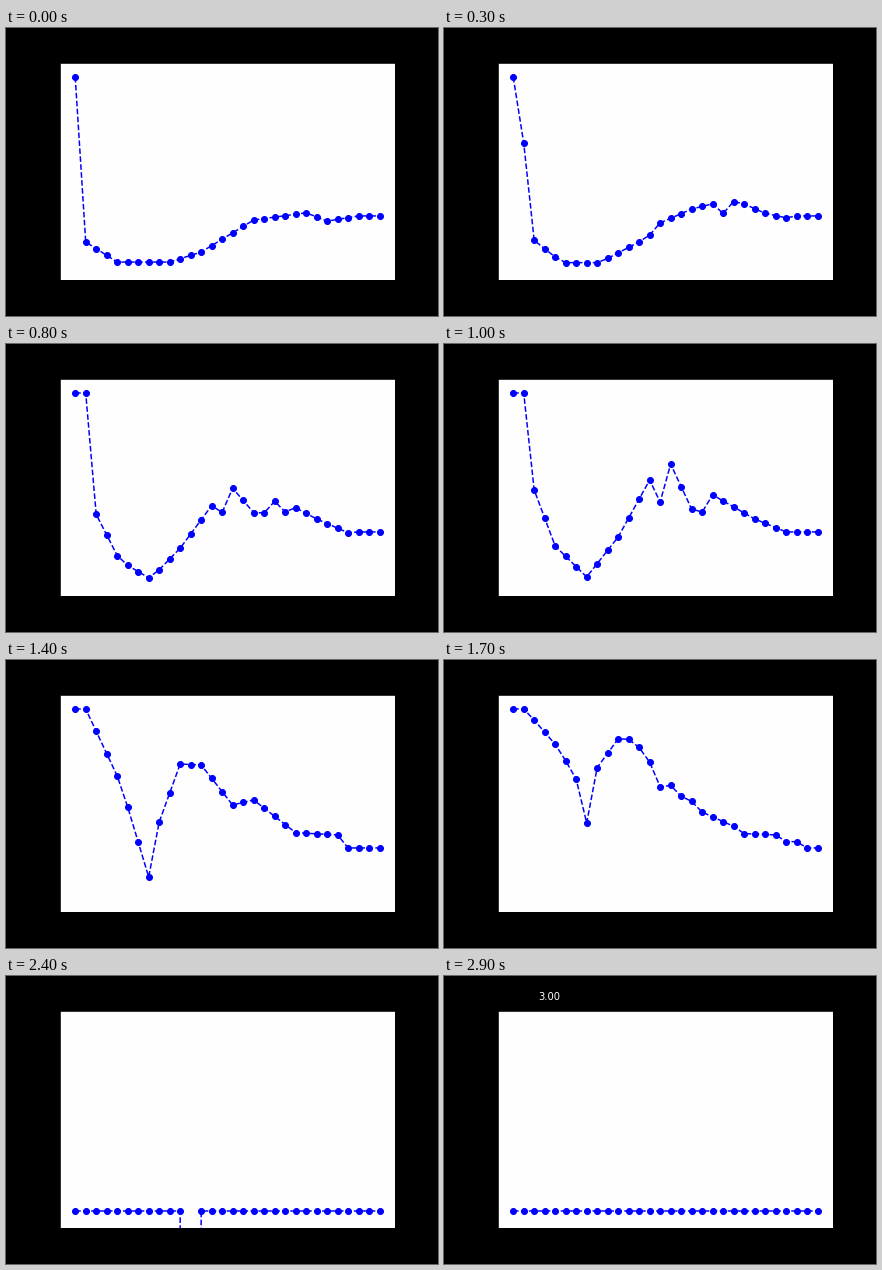
A matplotlib script that plays this animation: 432 px wide and 288 px high, repeating every 3000 ms.

```python
import numpy as np
import matplotlib.pyplot as plt
from matplotlib.animation import FuncAnimation

W, H, DPI = 432, 288, 72
FRAMES, INTERVAL = 30, 100
COUNT = 30
COLLAPSE = 23           # step at which the curve drops to zero
OFF_SCALE = -1000
TAIL = 0.253            # level the right end settles at

x = np.arange(COUNT)


def shape(*corners):
    """Polyline through (index, level) corners, flat beyond both ends."""
    return np.interp(x, *zip(*corners))


# The curve melts from each shape into the next.
SHAPES = {
    0: shape((0, 1), (1, 0.113), (4, 0.005), (9, 0.005), (12, 0.059),
             (17, 0.231), (22, 0.27), (24, 0.225), (27, TAIL)),
    5: shape((1, 1), (2, 0.151), (5, 0), (8, 0), (13, 0.188), (14, 0.274),
             (19, 0.366), (20, 0.274), (21, 0.376), (26, 0.242), (27, TAIL)),
    10: shape((1, 1), (2, 0.478), (4, 0.177), (7, 0.011), (10, 0.226),
              (13, 0.532), (14, 0.414), (15, 0.618), (17, 0.376),
              (18, 0.36), (19, 0.452), (23, 0.323), (26, TAIL)),
    14: shape((1, 1), (4, 0.64), (5, 0.473), (7, 0.097), (8, 0.392),
              (10, 0.704), (12, 0.699), (15, 0.484), (17, 0.511),
              (21, 0.335), (25, 0.323), (26, TAIL)),
    20: shape((2, 1), (6, 0.96), (7, 0.677), (8, 0.978), (11, 0.973),
              (13, 0.801), (14, 0.608), (15, 0.694), (16, 0.565),
              (18, 0.425), (21, 0.403), (22, 0.328), (27, 0.32), (28, TAIL)),
}


def levels(n):
    """Levels of all points at step n."""
    if n >= COLLAPSE:
        y = np.zeros(COUNT)
        spike = 11 + 5 * (n - 24)   # one stray point walks to the right
        if spike < COUNT:
            y[spike] = OFF_SCALE
        return y
    times = list(SHAPES)
    i = min(np.searchsorted(times, n, side="right"), len(times) - 1)
    t0, t1 = times[i - 1], times[i]
    t = (n - t0) / (t1 - t0)
    return np.clip((1 - t) * SHAPES[t0] + t * SHAPES[t1], 0, 1)


fig = plt.figure(figsize=(W / DPI, H / DPI), dpi=DPI, facecolor="black")
ax = fig.add_axes([0.125, 0.125, 0.775, 0.755], facecolor="#fefefe")
ax.set_xticks([])
ax.set_yticks([])
margin = 0.05 * (COUNT - 1)
ax.set_xlim(-margin, COUNT - 1 + margin)
ax.set_ylim(-0.0914, 1.0776)

line, = ax.plot(x, levels(0), "--o", color="#0000ff", lw=1.5, ms=6)
label = fig.text(94 / W, 1 - 24 / H, "3.00", color="white", fontsize=10,
                 family="DejaVu Sans", visible=False)


def update(n):
    line.set_ydata(levels(n))
    label.set_visible(n == FRAMES - 1)
    return line, label


anim = FuncAnimation(fig, update, frames=FRAMES, interval=INTERVAL,
                     repeat=True, repeat_delay=0, blit=False)
plt.show()
```
